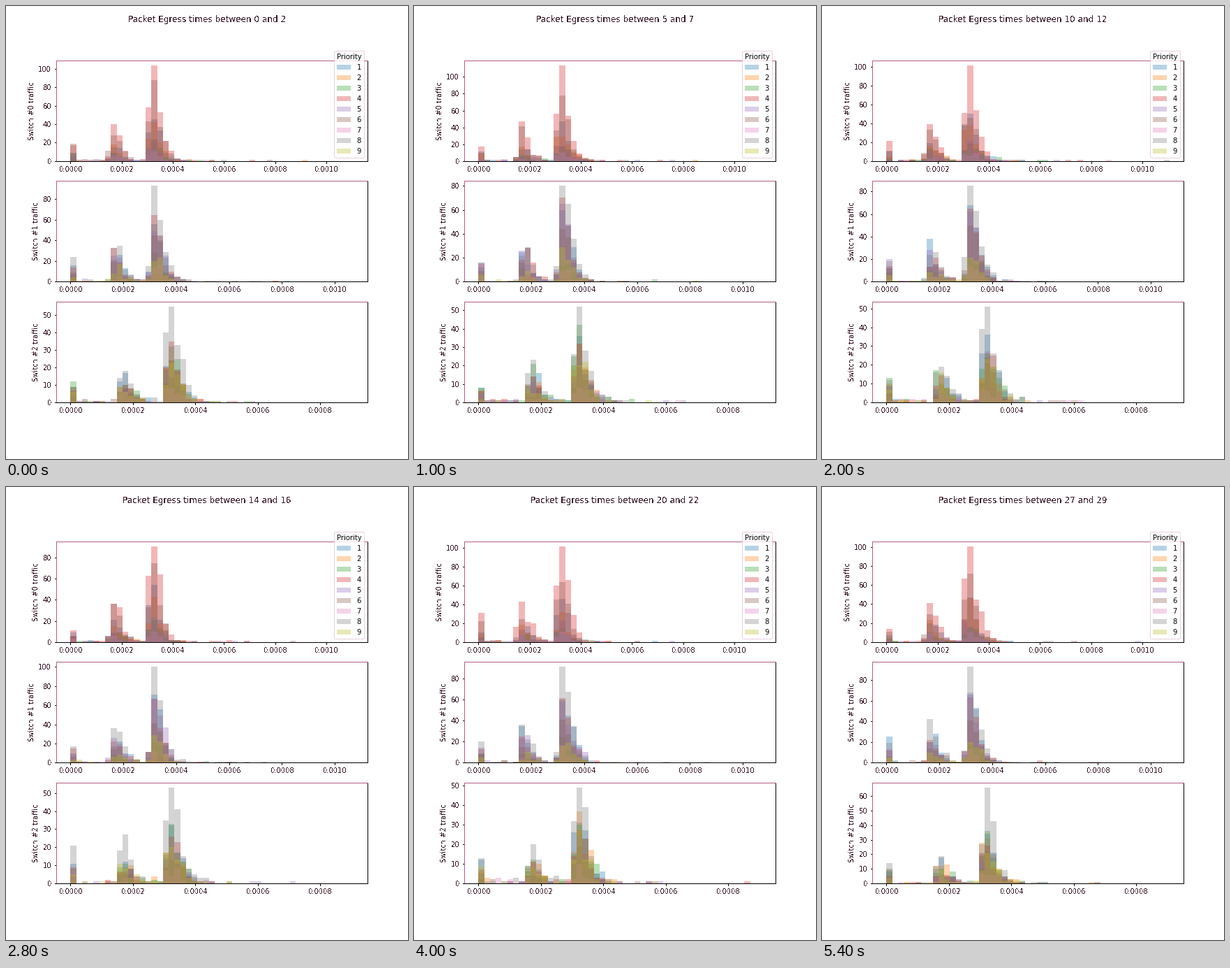
A matplotlib script that plays this animation: 576 by 648 pixels, repeating every 5.6 s.

```python
import numpy as np
import matplotlib.pyplot as plt
from matplotlib.animation import FuncAnimation
from matplotlib.patches import Patch
from matplotlib.ticker import MultipleLocator

FRAMES, STEP_MS, BINS = 28, 200, 49
INK, ROSE = "#38182a", "#b45c86"
PRIORITIES = range(1, 10)
COLORS = [f"C{i}" for i in range(9)]
ALPHA = 0.33

# Delays in seconds: each hop adds HOP, queueing spreads over SPREAD.
HOP, SPREAD = 150e-6, 18e-6
HOP_SHARES = (0.08, 0.37, 1)

# Per switch: time span, leading priority, typical peak of each priority,
# and the leader's peak at the key windows.
KEYS = [0, 3, 7, 14, 20, 23, 27]
SWITCHES = [
    dict(span=0.0011065, lead=3, amps=[48, 38, 20, 102, 20, 74, 10, 14, 0],
         peaks=[104, 117, 110, 91, 102, 93, 101]),
    dict(span=0.0010715, lead=7, amps=[68, 8, 22, 62, 62, 48, 10, 90, 25],
         peaks=[93, 86, 74, 100, 91, 91, 93]),
    dict(span=0.0009075, lead=7, amps=[35, 28, 34, 25, 18, 20, 8, 54, 24],
         peaks=[55, 54, 50, 53, 49, 60, 66]),
]

plt.rcParams.update({
    "font.family": "DejaVu Sans", "font.size": 10, "axes.linewidth": 1,
    "xtick.labelcolor": INK, "ytick.labelcolor": INK, "axes.labelcolor": INK,
})
rng = np.random.default_rng(7)


def delay_profile(edges):
    """Share of packets per bin, relative to the fullest bin."""
    share = np.zeros(len(edges) - 1)
    for hops, weight in enumerate(HOP_SHARES):
        if hops == 0:
            share[0] += weight
            continue
        x = np.maximum(edges - hops * HOP, 0) / SPREAD
        share += weight * np.diff(1 - (1 + x) * np.exp(-x))
    return share / share.max()


def make_counts(sw, edges):
    """Counts[window, priority, bin]; each window covers two seconds."""
    profile = delay_profile(edges)
    strays = 0.3 * np.exp(-(np.arange(BINS) / 22) ** 2)
    amps = np.array(sw["amps"])[:, None]
    mean = amps * profile + strays * (amps > 0)
    seconds = rng.poisson(mean / 2, (FRAMES + 1, *mean.shape))
    counts = (seconds[:-1] + seconds[1:]).astype(float)

    top = np.round(np.interp(np.arange(FRAMES), KEYS, sw["peaks"]))
    counts[:, sw["lead"], profile.argmax()] = top
    return np.minimum(counts, top[:, None, None])


def hard_edges(image, dpi):
    """Drop the faint pixels of antialiased text and make the rest solid."""
    image = image.copy()
    image[..., 3] = image[..., 3] > 0.5
    return image, 0, 0


fig, axes = plt.subplots(3, 1, figsize=(8, 9), dpi=72, facecolor="white")
fig.subplots_adjust(left=0.125, right=0.9, bottom=0.125, top=0.88, hspace=0.2)
title = fig.suptitle("", fontsize=12, color=INK)
title.set_agg_filter(hard_edges)

data, stairs = [], []
for n, (ax, sw) in enumerate(zip(axes, SWITCHES)):
    span = sw["span"]
    edges = np.linspace(0, span, BINS + 1)
    data.append(make_counts(sw, edges))
    stairs.append([ax.stairs(np.zeros(BINS), edges, fill=True, color=c,
                             alpha=ALPHA, linewidth=0) for c in COLORS])
    ax.set_xlim(-0.05 * span, 1.05 * span)
    ax.xaxis.set_major_locator(MultipleLocator(0.0002))
    ax.xaxis.set_major_formatter("{x:.4f}")
    ax.set_ylabel(f"Switch #{n} traffic")
    for axis in (ax.xaxis, ax.yaxis):
        axis.set_agg_filter(hard_edges)
    for side in ("top", "left"):
        ax.spines[side].set_color(ROSE)

swatches = [Patch(color=c, alpha=ALPHA, linewidth=0) for c in COLORS]
axes[0].legend(swatches, PRIORITIES, title="Priority", loc="lower right",
               edgecolor="#e2c6da")


def draw(k):
    title.set_text(f"Packet Egress times between {k} and {k + 2}")
    for ax, counts, steps in zip(axes, data, stairs):
        for step, values in zip(steps, counts[k]):
            step.set_data(values=values)
        ax.set_ylim(0, 1.05 * counts[k].max())


anim = FuncAnimation(fig, draw, frames=FRAMES, init_func=lambda: draw(0),
                     interval=STEP_MS, repeat=True)
plt.show()
```
